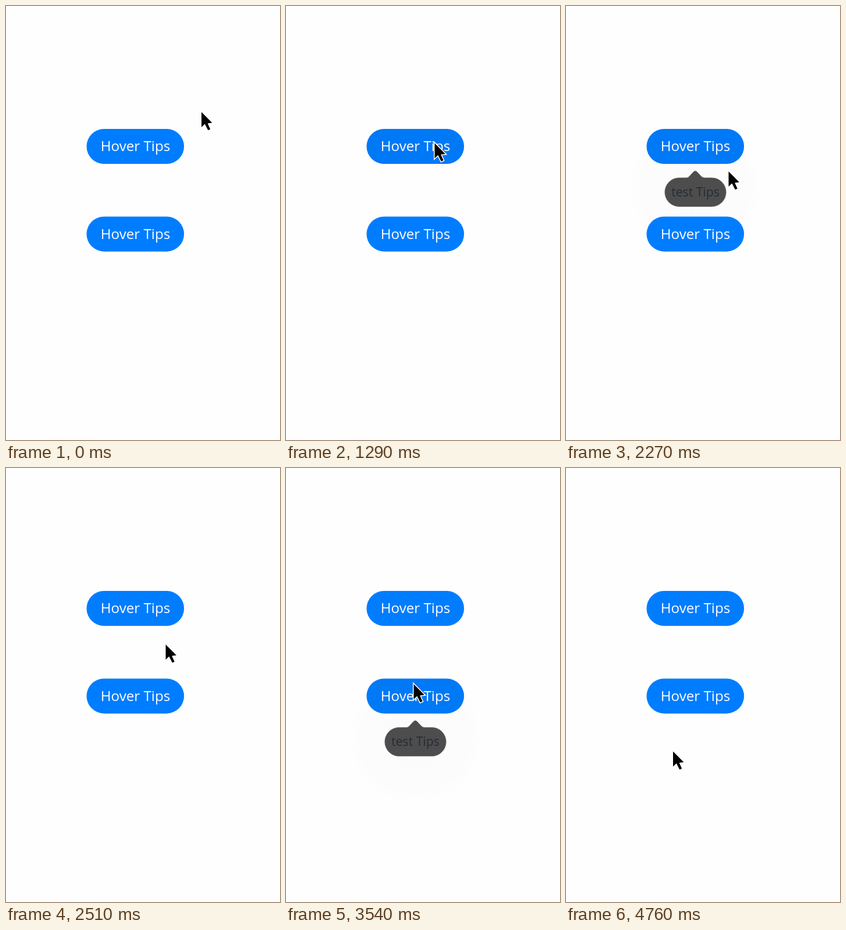
Recreate the animation shown at these times as an HTML page. Size 471x745 px, loop 4.83 s.

```html
<!DOCTYPE html>
<html lang="en">
<head>
<meta charset="utf-8">
<title>Hover tips</title>
<style>
  html, body { margin: 0; width: 100%; height: 100%; overflow: hidden; background: #fefefe; }
  svg { display: block; width: 471px; height: 745px; }
  text { font-family: "Open Sans", "Noto Sans", sans-serif; text-anchor: middle; }
  .label { font-size: 24.2px; font-weight: 500; fill: #fff; }
  .tip-label { font-size: 21.2px; fill: #242c36; }
</style>
</head>
<body>
<svg viewBox="0 0 471 745">
  <defs>
    <radialGradient id="shade">
      <stop offset="0" stop-opacity=".012"/>
      <stop offset=".8" stop-opacity=".008"/>
      <stop offset="1" stop-opacity="0"/>
    </radialGradient>
  </defs>
  <circle id="halo" cx="222" cy="312" r="116" fill="url(#shade)"/>
  <g id="buttons"></g>
  <g id="tip">
    <path fill="#4d4d4d" stroke="#5c5c5c" stroke-width=".8"
      d="M194.5 295H207Q210 295 212 292.5L219.5 284.5Q222.3 282 225 284.5L232.5 292.5Q235 295 238 295H250.5A24.6 24.6 0 0 1 250.5 344.2H194.5A24.6 24.6 0 0 1 194.5 295Z"/>
    <text class="tip-label" x="222.5" y="327">test Tips</text>
  </g>
  <path id="cursor" d="M0 0V26L5.8 20.6L11.3 31.2L15.2 29.4L10.6 19.4L18.4 18.6Z"
    stroke="#fff" stroke-width="3" paint-order="stroke"/>
</svg>
<script>
const LOOP = 4830;
const BUTTON_GAP = 150.4;
const NORMAL = "#007dff", HOVERED = "#0079f7";

// start time, cursor x, cursor y, hovered button, tip shown
const STEPS = [
  [0, 336, 182, -1, false],
  [750, 316, 183, -1, false],
  [990, 293, 188, -1, false],
  [1290, 255.5, 235.5, 0, false],
  [1530, 246, 231, 0, true],
  [2270, 279.5, 284, 0, true],
  [2510, 274.5, 303, -1, false],
  [2750, 260, 324, -1, false],
  [3000, 247, 337, -1, false],
  [3270, 237.5, 352, -1, false],
  [3540, 219.5, 371, 1, true],
  [4290, 201, 441, -1, false],
  [4530, 188, 466, -1, false],
  [4760, 184, 486.5, -1, false]
];

const byId = id => document.getElementById(id);
const move = (el, x, y) => el.setAttribute("transform", `translate(${x} ${y})`);

byId("buttons").innerHTML = [0, 1].map(i => `
  <g transform="translate(0 ${i * BUTTON_GAP})">
    <rect x="138.5" y="211" width="167.6" height="60" rx="30"/>
    <text class="label" x="222.5" y="249.3">Hover Tips</text>
  </g>`).join("");

const faces = document.querySelectorAll("#buttons rect");
const tipParts = [byId("halo"), byId("tip")];

function render(time) {
  const t = time % LOOP;
  const [, x, y, hovered, tipShown] = STEPS.findLast(step => step[0] <= t);
  move(byId("cursor"), x, y);
  faces.forEach((face, i) => face.setAttribute("fill", i === hovered ? HOVERED : NORMAL));
  for (const part of tipParts) {
    part.setAttribute("visibility", tipShown ? "visible" : "hidden");
    move(part, 0, Math.max(hovered, 0) * BUTTON_GAP);
  }
}

const start = performance.now();
function tick() {
  render(performance.now() - start);
  requestAnimationFrame(tick);
}
tick();
</script>
</body>
</html>
```
